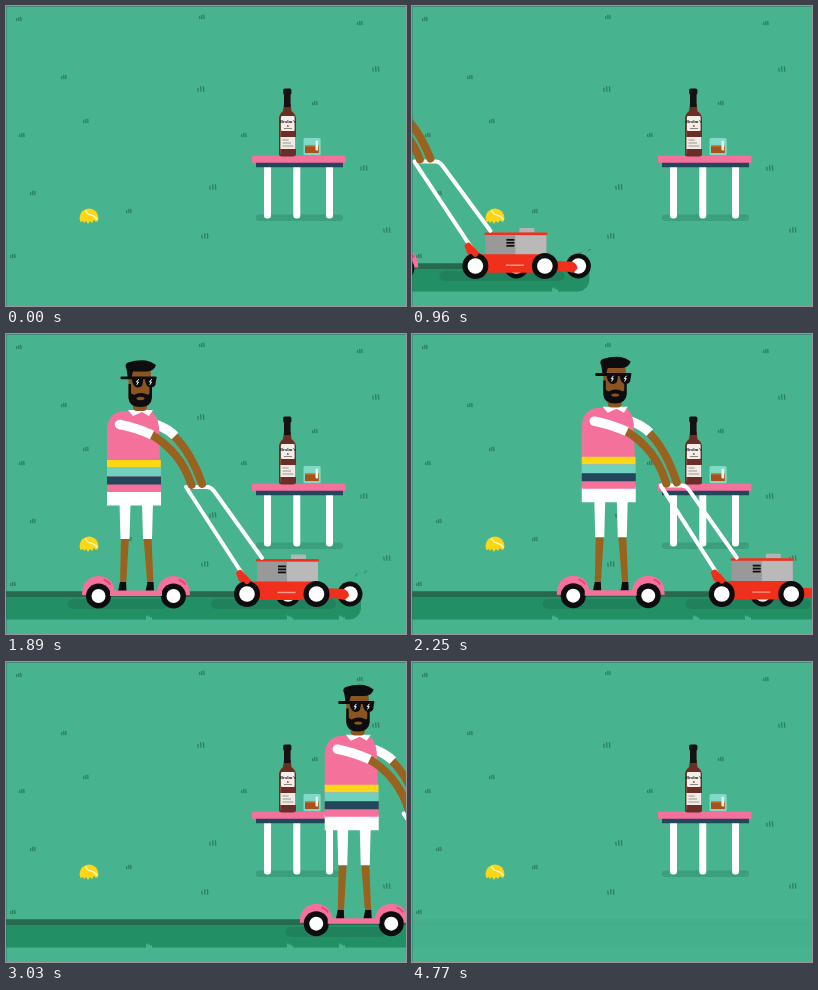
Write an HTML page with a canvas that moves like this. It is 400 px wide and 300 px high and loops after 6.77 s.

```html
<!DOCTYPE html>
<html lang="en">
<head>
<meta charset="utf-8">
<title>Mowing the lawn</title>
<style>
  html, body { margin: 0; width: 100%; height: 100%; overflow: hidden; background: #48b48f; }
  canvas { display: block; width: 100vw; height: 100vh; }
</style>
</head>
<body>
<canvas id="stage" width="400" height="300"></canvas>
<script>
const ctx = document.getElementById('stage').getContext('2d');
const LOOP = 6770, STEP = 30, SPEED = 0.191, BOB = 590;
const C = {
  grass: '#48b48f', tuft: '#2c805f', strip: '#238f64', edge: '#27694f', shade: '#3c9f7c',
  pink: '#f4719c', rose: '#e8456f', red: '#f0301c', navy: '#22465a', teal: '#70d2bd',
  yellow: '#fdd616', skin: '#99621f', face: '#8b5522', dark: '#0d0d0f', white: '#fff'
};
// x, y, size
const TUFTS = [
  [13, 13, 3], [58, 71, 3], [80, 115, 3], [16, 129, 3], [27, 187, 3], [7, 250, 3],
  [123, 205, 3], [196, 11, 3], [195, 83, 4], [354, 17, 3], [370, 63, 4], [309, 97, 3],
  [238, 129, 3], [358, 162, 4], [207, 181, 4], [199, 230, 4], [381, 224, 4]
];

function rect(color, x, y, w, h, r = 0) {
  ctx.fillStyle = color;
  ctx.beginPath();
  ctx.roundRect(x, y, w, h, r);
  ctx.fill();
}

function disc(color, x, y, rx, ry = rx) {
  ctx.fillStyle = color;
  ctx.beginPath();
  ctx.ellipse(x, y, rx, ry, 0, 0, Math.PI * 2);
  ctx.fill();
}

function fill(color, d) {
  ctx.fillStyle = color;
  ctx.fill(new Path2D(d));
}

function line(color, width, d, cap = 'round') {
  ctx.strokeStyle = color;
  ctx.lineWidth = width;
  ctx.lineCap = cap;
  ctx.lineJoin = 'round';
  ctx.stroke(new Path2D(d));
}

function text(str, x, y, size, color) {
  ctx.font = `bold ${size}px "Liberation Serif", serif`;
  ctx.textAlign = 'center';
  ctx.fillStyle = color;
  ctx.fillText(str, x, y);
}

function shifted(dx, dy, draw) {
  ctx.save();
  ctx.translate(dx, dy);
  draw();
  ctx.restore();
}

function wheel(x, y, r = 13, hub = 7.8) {
  disc(C.dark, x, y, r);
  disc(C.white, x, y, hub);
}

function tuft([x, y, s]) {
  for (let i = -1; i <= 1; i++) {
    const h = s * (i < 0 ? 1 : 1.4);
    line(C.tuft, 1.3, `M${x + i * s * 0.7} ${y + s * 0.7}l-.4 ${-h}`, 'butt');
  }
}

function ball() {
  disc(C.yellow, 83, 212, 9.5);
  line('#fff6c0', 1.4, 'M80 205q2 4 5 4q4 1 6 4');
  fill(C.grass, 'M72 223V214l3 2l2-1l1 2l2-2l2 3l2-3l2 2l2-3l2 2l4-2V223z');
}

function table() {
  rect(C.shade, 250, 208.5, 87, 6.5, 3);
  for (const x of [258, 287.3, 320]) rect(C.white, x, 158, 7, 54.5, 3);
  rect(C.navy, 250, 156, 87, 5.2);
  rect(C.pink, 246, 149.8, 93.5, 7);
}

function bottle() {
  fill('#6b2e27', 'M278 98H284.6L285.5 105Q290 108 290 113V148Q290 150.5 287 150.5H276Q273 150.5 273 148V113Q273 108 277 105z');
  rect('#86443a', 274, 112, 1.3, 36);
  rect('#161214', 278, 86, 6.6, 15);
  rect('#161214', 277.2, 82.5, 8.2, 6, 1.5);
  rect('#f3eeea', 275, 110, 13.6, 15, 1);
  text('Brolm’s', 281.8, 117, 4.6, '#1c1a1c');
  disc('#b54c43', 281.8, 120, 1);
  rect('#8d8581', 278, 122, 8, 1);
  rect('#f0ebe7', 274.5, 131, 15, 12);
  for (let i = 0; i < 3; i++) rect('#9d948f', 276.5, 133.5 + i * 3, 6 + i * 2.5, 1);
}

function glass() {
  rect('#7fdac5', 297.5, 132, 17.2, 17.3, 1.5);
  rect('#a9501d', 299, 140, 13.8, 7);
  rect('#c8742c', 299, 139.2, 13.8, 1.5);
  rect('#e9f7ef', 309.5, 134.5, 2.6, 10, 1);
}

// Mown strip: a dark edge trails behind the rear wheel.
function lawn(front) {
  rect(C.strip, -20, 262.5, front + 20, 23, [0, 5, 12, 0]);
  rect(C.edge, -20, 257.3, Math.max(0, front - 94), 5.7);
  for (const x of [143, 284, 336]) {
    if (x < front - 10) fill(C.grass, `M${x - 3} 286l0-5l2 2l1-2l1 3l2-1l0 3z`);
  }
}

function shadows() {
  for (const [x, w] of [[62, 100], [205, 125]]) rect('rgba(20,70,60,.18)', x, 265, w, 10, 5);
}

function clippings(t) {
  const k = (t % 240) / 240;
  for (let i = 0; i < 2; i++) {
    line(C.tuft, 1, `M${345 + i * 9 + k * 5} ${248 - i * 3 - k * 7}q1-2 2-2`);
  }
}

function mower(b) {
  wheel(282, 260, 12.5);
  wheel(344, 260, 12.5);
  shifted(0, b * 2, () => {
    rect('#b4b4b4', 285, 220.5, 15, 5, 1);
    rect('#999', 251, 225, 61, 24, 2);
    rect('#b9b9b9', 281, 228, 31, 20);
    rect(C.red, 250, 225, 63, 2.6, 1);
    for (let i = 0; i < 3; i++) rect(C.dark, 272, 231.5 + i * 3, 8, 1.8);
  });
  shifted(0, b, () => {
    fill(C.red, 'M230 239Q231 236 236 237L246 247.5H311L319 254L338 255Q343 257 343 262L339 266L328 264L318 266H252L244 256L233 247z');
    line('#ff9a8a', 1.4, 'M272 258.5H289');
  });
  wheel(241, 260);
  wheel(310.5, 260);
}

function handle(b) {
  const y = 153 + b * 3.6;
  line(C.white, 4, `M237 ${241 + b}L180 ${y}H201Q205 ${y} 208 ${y + 4}L256 ${224 + b}`);
  line(C.red, 6, `M234 ${239 + b}l7 8`);
}

function scooter() {
  for (const x of [92.5, 167.5]) {
    fill(C.pink, `M${x - 16.5} 261Q${x - 16} 242.5 ${x} 242Q${x + 16} 242.5 ${x + 16.5} 261z`);
    line(C.rose, 2, `M${x + 6} 246q4 1.5 5.5 4`);
    wheel(x, 262, 12.5, 7);
  }
  rect(C.pink, 104, 256.5, 52, 5.5);
}

function leg(x, foot, dy) {
  const top = 168 + dy, knee = 205 + dy * 0.5;
  fill(C.skin, `M${x - 4} ${knee - 2}H${x + 4}L${foot + 3} 252H${foot - 3}z`);
  fill(C.white, `M${x - 5.5} ${top}H${x + 5.5}L${x + 4.5} ${knee}H${x - 4.5}z`);
  fill(C.dark, `M${foot - 3} 248H${foot + 3}L${foot + 3.5} 257Q${foot} 259 ${foot - 5} 257.5z`);
}

function torso() {
  fill(C.white, 'M101 156H155V171.5H101z');
  fill(C.pink, 'M101 158V97Q101 79 117 77H144Q151 79 153 93L155 158z');
  rect(C.yellow, 101, 126, 53.8, 7.5);
  rect(C.teal, 101, 133.5, 53.9, 9);
  rect(C.navy, 101, 142.5, 54, 8);
  fill(C.white, 'M122 76H147L143 82L136 78L127 82z');
}

function head() {
  rect(C.face, 127, 66, 14, 11, 4);
  rect(C.face, 122.5, 34, 22.5, 34, 5);
  fill(C.dark, 'M122.5 50H125V59Q127 62 130 60Q135 58 140 60Q143 62 143.5 59V50H146V64Q145 73 134.5 73Q123 73 122.5 64z');
  disc(C.face, 134.5, 64.5, 4, 1.7);
  fill(C.dark, 'M122 45L120.5 35Q118 30 122 28.5Q131 25.5 140 26.5Q145 27 150 31Q148 37 141 37.5H127L125 45z');
  rect(C.dark, 114.5, 42.5, 36, 2.8, 1);
  for (const x of [125.5, 138.5]) {
    fill(C.dark, `M${x} 43h12l-1 7.5q-1 3-5 3q-5 0-6-10.5z`);
    line(C.white, 1, `M${x + 7} 45.5l-2 2.5h2l-1.5 2.5`);
  }
}

function arm(sx, sy, ex, ey, hx, hy) {
  line(C.skin, 8, `M${ex - 2} ${ey - 1}Q${hx - 11} ${ey + 16} ${hx} ${hy}`);
  disc(C.white, sx, sy, 4.7);
  line(C.white, 9.4, `M${sx} ${sy}Q${(sx + ex) / 2 + 2} ${(sy + ey) / 2 - 1.5} ${ex} ${ey}`, 'butt');
}

function rider(b) {
  const dy = b * 8.5, hand = 151 + b * 3.6;
  leg(119, 117, dy);
  leg(141.5, 144.5, dy);
  shifted(0, dy * 0.1, scooter);
  arm(151, 91 + dy, 169, 102 + dy, 196, hand - 1);
  shifted(0, dy * 0.92, torso);
  shifted(0, dy, head);
  arm(113.5, 90.5 + dy, 146, 101 + dy, 185.5, hand);
}

function draw(time) {
  const t = Math.floor((time % LOOP) / STEP) * STEP;
  const dx = (t - 1890) * SPEED;
  const b = Math.cos((t - 2640) / BOB * Math.PI * 2) + 0.13;

  rect(C.grass, 0, 0, 400, 300);
  TUFTS.forEach(tuft);
  ball();
  table();
  bottle();
  glass();

  if (t >= 60) {
    const fade = Math.min(1, Math.max(0, (t - 4200) / 570));
    ctx.globalAlpha = 1 - fade * 0.92;
    lawn(Math.min(420 + 114, 355 + dx));
    ctx.globalAlpha = 1;
  }
  if (t >= 60 && t < 3600) {
    shifted(dx, 0, () => {
      shadows();
      clippings(t);
      mower(b);
      handle(b);
      rider(b);
    });
  }
  rect('rgba(60,95,100,.5)', 0, 0, 400, 1);
  rect('rgba(60,95,100,.4)', 0, 0, 1, 300);
}

const start = performance.now();
function tick(now) {
  draw(Math.max(0, now - start));
  requestAnimationFrame(tick);
}
draw(0);
requestAnimationFrame(tick);
</script>
</body>
</html>
```
